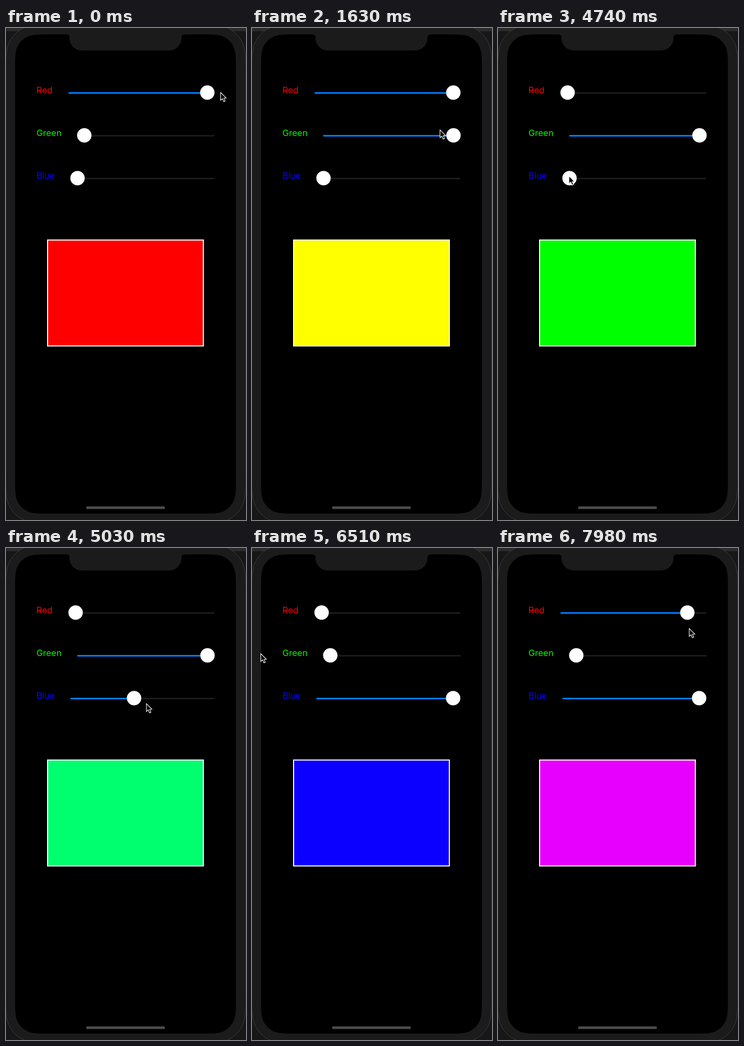
Write an HTML page with a canvas that moves like this. It is 450 by 920 pixels and loops after 8000 ms.

```html
<!DOCTYPE html>
<html lang="en">
<head>
<meta charset="utf-8">
<title>Colour sliders</title>
<style>
  html, body { margin: 0; width: 100%; height: 100%; overflow: hidden; background: #000; }
  canvas { display: block; width: 100vw; height: 100vh; }
</style>
</head>
<body>
<canvas id="stage"></canvas>
<script>
const W = 450, H = 920, LOOP = 8000, TICK = 147.8;
const KNOB = 13.5, RAMP = 2.75;
const canvas = document.getElementById('stage');
const ctx = canvas.getContext('2d');
const ratio = window.devicePixelRatio || 1;
canvas.width = W * ratio;
canvas.height = H * ratio;

// Each drag is [start tick, end value]; every drag lasts RAMP ticks.
const sliders = [
  { label: 'Red', color: '#ff0000', y: 121, left: 117, right: 391,
    value: 1, drags: [[21.3, 0], [51.5, 1]] },
  { label: 'Green', color: '#00f900', y: 201, left: 133.3, right: 391.3,
    value: 0, drags: [[5, 1], [40.4, 0]] },
  { label: 'Blue', color: '#0b00ff', y: 281, left: 120.6, right: 390.6,
    value: 0, drags: [[32.8, 1]] }
];

// Pointer glides: start tick, end tick, destination. It rests in between.
const home = { x: 402, y: 120 };
const glides = [
  [0, 4, 147, 201], [4, 8, 381.6, 221], [8, 11, 352, 190],
  [19, 20, 392, 137], [20, 26, 19, 110], [27, 30, 134, 281],
  [30, 32, 132.5, 276], [32, 36, 393, 305], [36, 39, 378, 268],
  [39, 40, 379, 204], [40, 44, 16, 197], [44, 45, 6, 197],
  [47, 49, 85, 78], [49, 51, 126, 123], [51, 55, 401, 155]
];

const progress = (t, from, to) => Math.min(1, Math.max(0, (t - from) / (to - from)));
const smooth = p => p * p * (3 - 2 * p);
const mix = (a, b, p) => a + (b - a) * p;

function sliderValue({ value, drags }, tick) {
  return drags.reduce((v, [start, to]) => mix(v, to, progress(tick, start, start + RAMP)), value);
}

function pointerAt(tick) {
  return glides.reduce((pos, [from, to, x, y]) => {
    const p = smooth(progress(tick, from, to));
    return { x: mix(pos.x, x, p), y: mix(pos.y, y, p) };
  }, home);
}

function roundRect(x, y, w, h, r, fill) {
  ctx.beginPath();
  ctx.roundRect(x, y, w, h, r);
  ctx.fillStyle = fill;
  ctx.fill();
}

// Rounded rectangle whose corners ease into the straight sides.
function softRect(x, y, w, h, r, fill) {
  const far = 1.528 * r, mid = 1.088 * r, near = .868 * r;
  const a = .631 * r, b = .075 * r, c = .372 * r, d = .169 * r;
  ctx.beginPath();
  for (let i = 0; i < 4; i++) {
    const sx = i === 0 || i === 3 ? 1 : -1, sy = i < 2 ? 1 : -1;
    const ox = sx > 0 ? x : x + w, oy = sy > 0 ? y : y + h;
    const at = (u, v) => i % 2 ? [ox + sx * v, oy + sy * u] : [ox + sx * u, oy + sy * v];
    ctx.lineTo(...at(0, far));
    ctx.bezierCurveTo(...at(0, mid), ...at(0, near), ...at(b, a));
    ctx.bezierCurveTo(...at(d, c), ...at(c, d), ...at(a, b));
    ctx.bezierCurveTo(...at(near, 0), ...at(mid, 0), ...at(far, 0));
  }
  ctx.closePath();
  ctx.fillStyle = fill;
  ctx.fill();
}

function drawPhone() {
  ctx.fillStyle = '#171717';
  ctx.fillRect(0, 0, W, H);
  ctx.fillStyle = '#2b2b2b';
  ctx.fillRect(0, 0, W, 6);
  softRect(-.5, -5.5, 450, 931, 59, '#1b1b1b');
  ctx.strokeStyle = '#3a3a3a';
  ctx.lineWidth = 1;
  ctx.stroke();
  softRect(17, 12, 414, 896, 41.5, '#000');

  ctx.beginPath();
  ctx.moveTo(113, 11);
  ctx.lineTo(113, 12);
  ctx.quadraticCurveTo(119, 12, 119, 18);
  ctx.arcTo(119, 42, 143, 42, 23);
  ctx.arcTo(329, 42, 329, 18, 23);
  ctx.lineTo(329, 18);
  ctx.quadraticCurveTo(329, 12, 335, 12);
  ctx.lineTo(335, 11);
  ctx.fillStyle = '#1b1b1b';
  ctx.fill();

  roundRect(150, 894.5, 148, 5, 2.5, '#4b4b4b');
}

function drawSlider({ label, color, y, left, right }, value) {
  ctx.font = '16.5px Inter, sans-serif';
  ctx.fillStyle = color;
  ctx.fillText(label, 57, y + 1.3);

  const x = mix(left + KNOB, right - KNOB, value);
  roundRect(left, y - 1, right - left, 3, 1.5, '#1b1b1b');
  if (value > 0) roundRect(left, y - 1, x - left, 3, 1.5, '#007aff');
  ctx.beginPath();
  ctx.arc(x, y - .3, KNOB, 0, Math.PI * 2);
  ctx.fillStyle = '#fff';
  ctx.fill();
}

function drawSwatch([r, g, b]) {
  const red = Math.max(r * 255, 11 * b * (1 - g));
  ctx.fillStyle = '#fff';
  ctx.fillRect(77, 395.5, 294, 200);
  ctx.fillStyle = `rgb(${Math.round(red)},${Math.round(g * 255)},${Math.round(b * 255)})`;
  ctx.fillRect(79, 397.5, 290, 196);
}

function drawPointer({ x, y }) {
  ctx.save();
  ctx.translate(x + .5, y + .7);
  ctx.beginPath();
  ctx.moveTo(0, 0);
  ctx.lineTo(0, 14.5);
  ctx.lineTo(3.4, 11.5);
  ctx.lineTo(5.8, 17);
  ctx.lineTo(8.4, 15.9);
  ctx.lineTo(6.1, 10.6);
  ctx.lineTo(10.4, 10.4);
  ctx.closePath();
  ctx.fillStyle = '#000';
  ctx.fill();
  ctx.strokeStyle = '#fff';
  ctx.lineWidth = 1.1;
  ctx.stroke();
  ctx.restore();
}

function draw(time) {
  const tick = Math.floor(time / TICK + .02);
  const values = sliders.map(s => sliderValue(s, tick));
  ctx.setTransform(ratio, 0, 0, ratio, 0, 0);
  drawPhone();
  sliders.forEach((s, i) => drawSlider(s, values[i]));
  drawSwatch(values);
  drawPointer(pointerAt(tick));
}

const start = performance.now();
function frame() {
  draw((performance.now() - start) % LOOP);
  requestAnimationFrame(frame);
}
frame();
</script>
</body>
</html>
```
